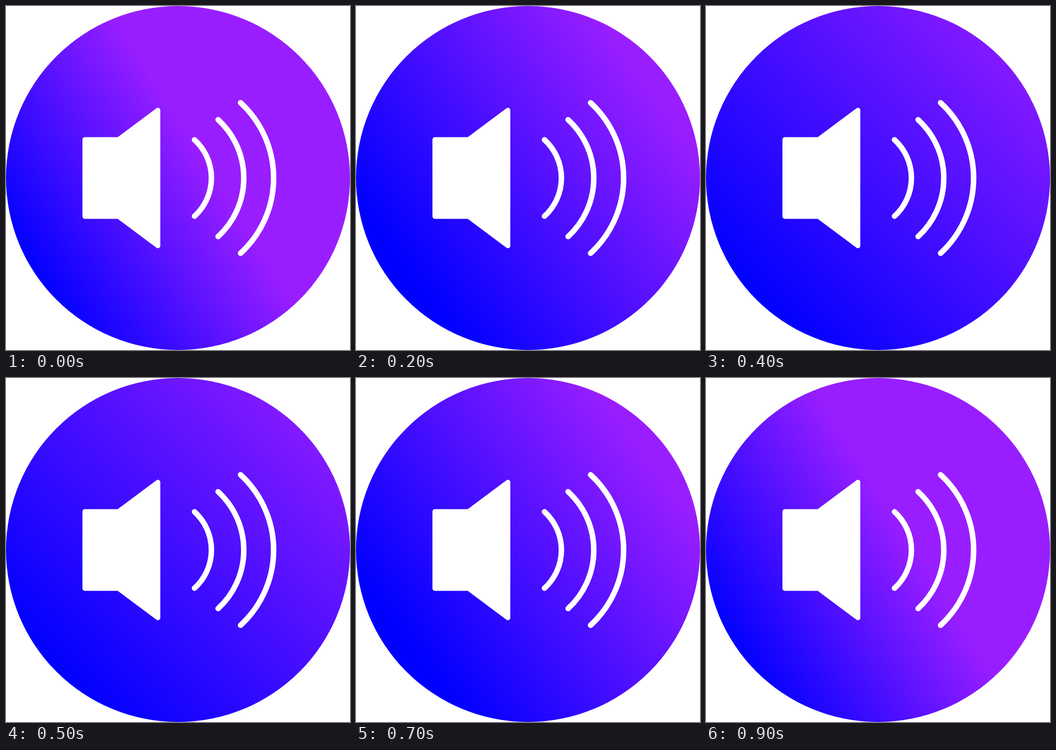
An HTML page for the animation above (0.95 s loop, 720 by 720 pixels).

```html
<!DOCTYPE html>
<html lang="en">
<head>
<meta charset="utf-8">
<title>Speaker</title>
<style>
  html, body { margin: 0; width: 100%; height: 100%; overflow: hidden; background: #fff; }
  svg { display: block; width: 100%; height: 100%; }
  .cone { fill: #fff; stroke: #fff; stroke-width: 10; stroke-linejoin: round; }
  .waves { fill: none; stroke: #fff; stroke-width: 11.5; stroke-linecap: round; }
</style>
</head>
<body>
<svg viewBox="0 0 720 720">
  <defs>
    <linearGradient id="glow" gradientUnits="userSpaceOnUse">
      <stop offset="0" stop-color="#0000ff"/>
      <stop offset="1" stop-color="#991eff"/>
    </linearGradient>
  </defs>
  <circle cx="360" cy="360" r="360" fill="url(#glow)"/>
  <path class="cone" d="M165 279.5H235.5L318 218V502L235.5 440.5H165Z"/>
  <g class="waves">
    <path d="M394.5 280A108 108 0 0 1 394.5 440"/>
    <path d="M444 238A166 166 0 0 1 444 482.5"/>
    <path d="M491 202.5A214 214 0 0 1 491 517.5"/>
  </g>
</svg>
<script>
  const STEP = 50, FRAMES = 19, CENTER = 360;
  const glow = document.getElementById('glow');

  // step, axis angle in degrees, blue and purple ends measured from the centre
  const keys = [
    [0, 32, -365, 70],
    [2, 42, -318, 167],
    [4, 36, -315, 320],
    [8, 43.5, -360, 490],
    [9, 44, -365, 505]
  ];

  function poseAt(k) {
    const i = Math.max(1, keys.findIndex(key => key[0] >= k));
    const a = keys[i - 1], b = keys[i];
    const u = (k - a[0]) / (b[0] - a[0]);
    return a.map((v, j) => v + (b[j] - v) * u);
  }

  function draw() {
    const frame = Math.floor(performance.now() / STEP) % FRAMES;
    const [, deg, from, to] = poseAt(Math.min(frame, FRAMES - 1 - frame));
    const dx = Math.cos(deg * Math.PI / 180), dy = -Math.sin(deg * Math.PI / 180);
    const place = (n, d) => {
      glow.setAttribute('x' + n, CENTER + dx * d);
      glow.setAttribute('y' + n, CENTER + dy * d);
    };
    place(1, from);
    place(2, to);
    requestAnimationFrame(draw);
  }
  draw();
</script>
</body>
</html>
```
